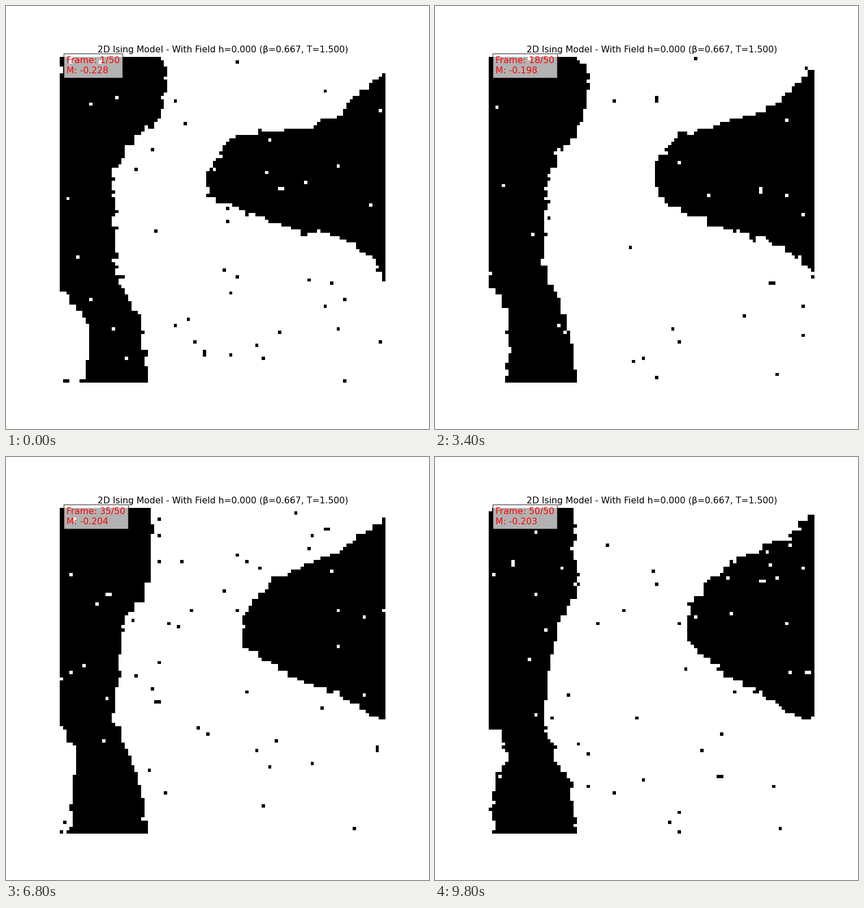
Write a matplotlib script that moves like this. It is 748 px wide and 748 px high and loops after 10 s.

```python
import matplotlib.pyplot as plt
import numpy as np
from matplotlib.animation import FuncAnimation

N = 100
FRAMES = 50
TEMP = 1.5
MID = np.arange(N) + 0.5
ROW, COL = MID[:, None], MID[None, :]
PARITY = np.add.outer(np.arange(N), np.arange(N)) % 2


def drift(t, x, nodes, first, last):
    """Curve through a few nodes that moves steadily from first to last."""
    values = (1 - t) * np.array(first) + t * np.array(last)
    return np.interp(x, nodes, values)


def left_domain(t):
    inner = drift(t, ROW, [0, 10, 20, 25, 35, 50, 65, 75, 85, 100],
                  [32, 33, 31, 24, 16, 17, 17, 22, 25, 27],
                  [26, 26, 27, 28, 22, 18, 17, 20, 25, 27])
    outer = drift(t, ROW, [66, 72, 77, 82, 90, 100],
                  [0, 0, 5, 9, 9, 8],
                  [0, 5, 6, 2, 1, 2])
    return (COL >= outer) & (COL < inner)


def right_domain(t):
    tip = 45.5 + 15.5 * t
    u = (COL - tip) / (N - tip)
    nodes = [0, 0.08, 0.2, 0.45, 0.6, 0.75, 0.9, 1]
    upper = drift(t, u, nodes, [36, 27, 24, 22.5, 22, 17, 8, 5],
                  [32, 26, 21, 15, 11, 10, 6, 1])
    lower = drift(t, u, nodes, [42, 45, 48, 52, 54, 55, 60, 69],
                  [41, 44, 48, 54, 57, 61, 64, 66])
    return (u >= 0) & (ROW >= upper) & (ROW < lower)


def thermalise(spins, rng):
    """One checkerboard heat-bath sweep with periodic edges."""
    for parity in (0, 1):
        near = sum(np.roll(spins, d, axis) for d in (1, -1) for axis in (0, 1))
        flip = rng.random((N, N)) < 1 / (1 + np.exp(2 * spins * near / TEMP))
        spins = np.where(flip & (PARITY == parity), -spins, spins)
    return spins


def lattice(step):
    t = step / (FRAMES - 1)
    spins = np.where(left_domain(t) | right_domain(t), 1, -1)
    return thermalise(spins, np.random.default_rng(100 + step))


def magnetisation(step):
    return np.interp(step, [0, 8, 17, 25, 30, 49],
                     [-0.228, -0.205, -0.198, -0.219, -0.204, -0.203])


fig, ax = plt.subplots(figsize=(8, 8), dpi=93.5)
image = ax.imshow(lattice(0), cmap="binary", vmin=-1, vmax=1,
                  interpolation="nearest")
ax.set_title("2D Ising Model - With Field h=0.000 (β=0.667, T=1.500)")
ax.axis("off")
label = ax.text(0.02, 0.95, "", transform=ax.transAxes, color="red",
                fontsize=12, bbox=dict(facecolor="white", alpha=0.7))


def draw(step):
    image.set_data(lattice(step))
    label.set_text(f"Frame: {step + 1}/{FRAMES}\n"
                   f"M: {magnetisation(step):.3f}")
    return image, label


anim = FuncAnimation(fig, draw, frames=FRAMES, interval=200,
                     init_func=lambda: draw(0), repeat=True, repeat_delay=0)
plt.show()
```
